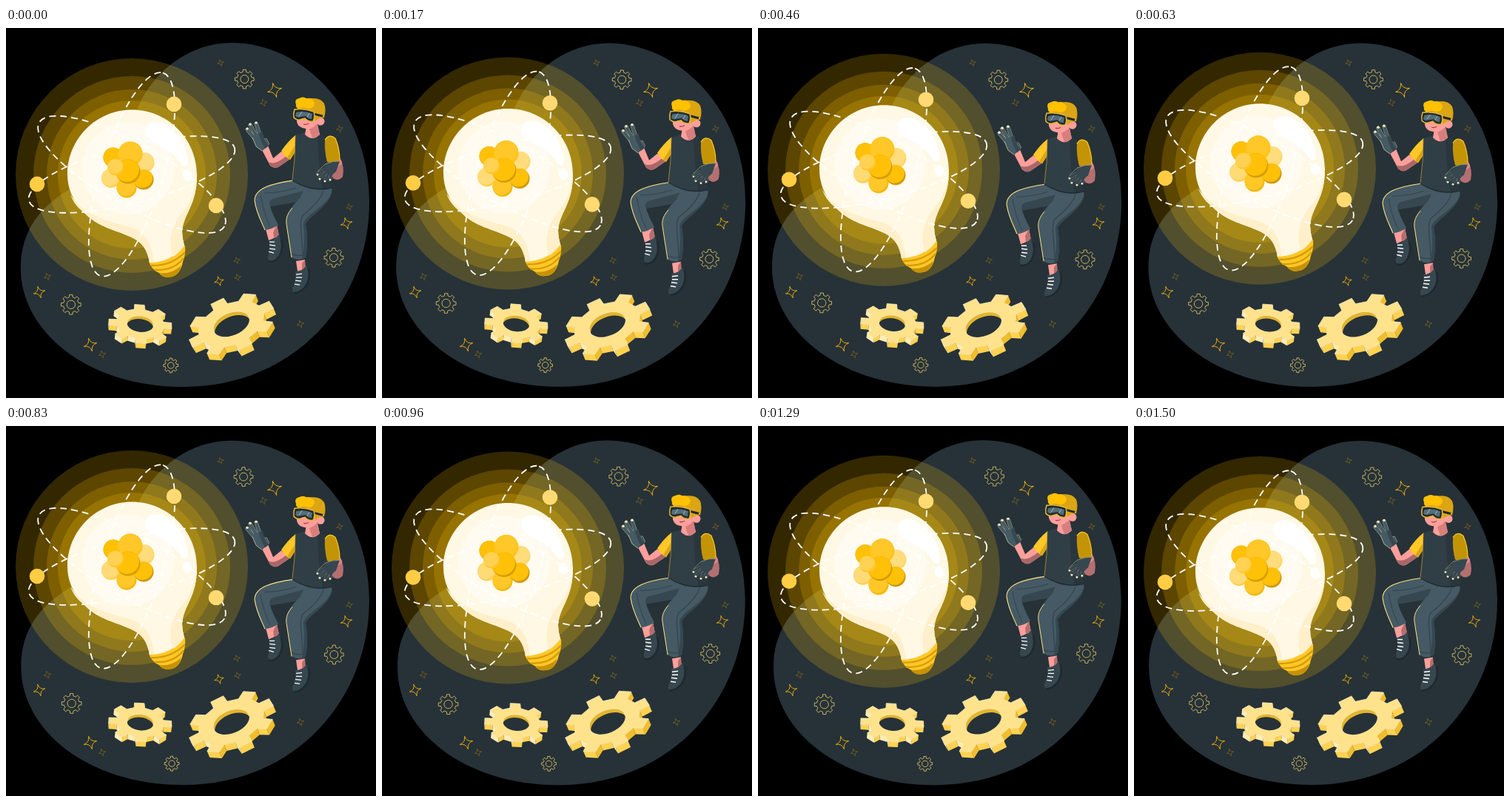
Recreate the animation shown at these times as an HTML page with a canvas. Size 500 by 500 pixels, loop 1540 ms.

```html
<!DOCTYPE html>
<html lang="en">
<head>
<meta charset="utf-8">
<style>
html, body { margin: 0; width: 100%; height: 100%; overflow: hidden; background: #000; }
canvas { display: block; width: 100vw; height: 100vh; }
</style>
</head>
<body>
<canvas id="stage" width="500" height="500"></canvas>
<script>
const ctx = document.getElementById('stage').getContext('2d');
const LOOP = 1540, TAU = Math.PI * 2;
const YELLOW = '#ffc727', GOLD = '#dba514', PALE = '#ffe28c', NAVY = '#263238';
const SLATE = '#455a64', STEEL = '#37474f', INK = '#1f2a30', SKIN = '#ff9f9b', SKIN_DARK = '#b56f70';

const wave = (t, shift) => Math.sin(TAU * (t + shift) / LOOP);

function fill(d, color) {
  ctx.fillStyle = color;
  ctx.fill(new Path2D(d));
}

function line(d, color, width = 1) {
  ctx.strokeStyle = color;
  ctx.lineWidth = width;
  ctx.stroke(new Path2D(d));
}

function oval(x, y, rx, ry, angle, color) {
  ctx.beginPath();
  ctx.ellipse(x, y, rx, ry, angle, 0, TAU);
  ctx.fillStyle = color;
  ctx.fill();
}

const disc = (x, y, r, color) => oval(x, y, r, r, 0, color);

function group(draw, dx, dy, angle = 0, cx = 0, cy = 0) {
  ctx.save();
  ctx.translate(cx + dx, cy + dy);
  ctx.rotate(angle);
  ctx.translate(-cx, -cy);
  draw();
  ctx.restore();
}

// Corner points of a cog on the unit circle, mapped by place(radius, angle).
function cogPoints(teeth, root, phase, place) {
  const points = [];
  for (let i = 0; i < teeth; i++) {
    const mid = phase + i * TAU / teeth, step = TAU / teeth;
    for (const [r, k] of [[root, -.28], [1, -.2], [1, .2], [root, .28]]) {
      points.push(place(r, mid + k * step));
    }
  }
  return points;
}

function trace(points) {
  ctx.beginPath();
  points.forEach(p => ctx.lineTo(p[0], p[1]));
  ctx.closePath();
}

function outlineCog(x, y, r) {
  ctx.strokeStyle = '#d9bd63';
  ctx.lineWidth = .9;
  trace(cogPoints(8, .77, 0, (k, a) => [x + k * r * Math.cos(a), y + k * r * Math.sin(a)]));
  ctx.stroke();
  ctx.beginPath();
  ctx.arc(x, y, r * .42, 0, TAU);
  ctx.stroke();
}

function backdrop() {
  fill('M305 20C400 20 491 110 491 235C491 370 390 485 240 485C110 485 20 410 20 325C20 275 45 240 95 213C165 175 165 130 183 97C205 55 250 20 305 20Z', NAVY);
  outlineCog(322, 69, 13);
  outlineCog(88, 374, 13.5);
  outlineCog(443, 310, 13);
  outlineCog(223, 456, 10);
}

function sparkle(x, y, r) {
  const big = r > 5;
  const at = (k, a) => [x + k * Math.cos(a - .27), y + k * Math.sin(a - .27)];
  ctx.beginPath();
  ctx.moveTo(...at(r, 0));
  for (let i = 1; i <= 4; i++) {
    ctx.quadraticCurveTo(...at(r * .12, (i - .5) * TAU / 4), ...at(r, i * TAU / 4));
  }
  ctx.strokeStyle = big ? '#e5a70c' : '#806419';
  ctx.lineWidth = big ? 1 : .8;
  ctx.stroke();
}

const SPARKLES = [
  [363, 84, 10], [348, 101, 5], [290, 47, 4.5], [451, 136, 4.5], [464, 242, 4.5],
  [460, 264, 8], [312, 314, 4.5], [288, 342, 6.5], [313, 337, 4.5], [398, 400, 5],
  [45, 357, 8], [56, 336, 5], [114, 428, 9], [130, 441, 5]
];

function solidCog({ x, y, rx, ry, tilt, phase, depth, hole }) {
  const c = Math.cos(tilt), s = Math.sin(tilt);
  const ex = -s * depth, ey = c * depth;
  const place = (k, a) => {
    const u = k * rx * Math.cos(a), v = k * ry * Math.sin(a);
    return [x + u * c - v * s, y + u * s + v * c];
  };
  const face = cogPoints(8, .76, phase, place);
  const sides = face.map((p, i) => [p, face[(i + 1) % face.length]])
    .filter(([p, q]) => (q[1] - p[1]) * ex > (q[0] - p[0]) * ey)
    .sort((m, n) => m[0][1] + m[1][1] - n[0][1] - n[1][1]);
  for (const [p, q] of sides) {
    const facing = Math.atan2(q[1] - p[1], p[0] - q[0]);
    trace([p, q, [q[0] + ex, q[1] + ey], [p[0] + ex, p[1] + ey]]);
    ctx.fillStyle = facing < -.2 ? '#ffecb3' : facing > .6 ? '#f0bd2c' : '#ffd252';
    ctx.fill();
  }
  trace(face);
  ctx.fillStyle = PALE;
  ctx.fill();
  ctx.strokeStyle = '#ffeebb';
  ctx.lineWidth = .8;
  ctx.stroke();
  ctx.save();
  ctx.beginPath();
  ctx.ellipse(x, y, rx * hole, ry * hole, tilt, 0, TAU);
  ctx.fillStyle = '#e2b530';
  ctx.fill();
  ctx.stroke();
  ctx.clip();
  oval(x + ex * .6, y + ey * .6, rx * hole, ry * hole, tilt, NAVY);
  ctx.restore();
}

function cogs() {
  solidCog({ x: 181.5, y: 400, rx: 43, ry: 26, tilt: .12, phase: -.1, depth: 7, hole: .42 });
  solidCog({ x: 304.5, y: 400, rx: 61, ry: 36.5, tilt: -.39, phase: -.1, depth: 9, hole: .42 });
}

function orbit(angle, minor) {
  ctx.beginPath();
  ctx.ellipse(170, 198, 143.5, minor, angle, 0, TAU);
  ctx.stroke();
}

function ball(x, y, r, color, shade) {
  disc(x, y, r, shade);
  ctx.save();
  ctx.beginPath();
  ctx.arc(x, y, r, 0, TAU);
  ctx.clip();
  disc(x - 1.5, y - 2.5, r, color);
  ctx.restore();
}

function bulb() {
  for (const r of [157, 133, 115, 100]) disc(170, 198, r, 'rgba(255,193,0,.2)');

  fill('M193 316L242 294Q243 307 239 316Q236 332 225 336Q212 339 207 331Q197 327 193 316Z', YELLOW);
  line('M196 321Q223 322 242 303M200 327Q226 329 240 311', '#d39c05', 2.2);
  fill('M207 331Q224 333 237 321Q234 334 225 336Q212 339 207 331Z', '#c79205');

  fill('M170 110.5C219 110.5 258 150 258 199C258 240 240 250 238 275Q238 284 241 294Q223 317 194 317C191 300 185 291 172 284C150 273 125 270 106 250C90 234 83 216 83 198C83 150 122 110.5 170 110.5Z', '#fff8e4');
  fill('M258 199C258 240 240 250 238 275Q238 284 241 294Q234 304 226 309C218 290 224 267 237 251C249 237 256 221 258 199Z', '#fff0cb');
  fill('M87 225C91 236 97 243 106 250C125 270 150 273 172 284C185 291 191 300 194 317L200 316C197 292 189 277 171 270C140 261 106 255 87 225Z', '#fff0cb');
  disc(165, 190, 62, '#fffbf0');
  fill('M190 133Q196 124 212 129Q240 143 246 178Q247 190 238 186Q226 166 200 155Q184 146 190 133Z', '#fff');
  oval(245, 199, 6, 8, -.2, '#fff');

  ctx.strokeStyle = '#fff';
  ctx.lineWidth = 1.8;
  ctx.setLineDash([9, 6]);
  orbit(-.25, 39);
  orbit(.51, 42);
  orbit(-1.273, 42);
  ctx.setLineDash([]);
  disc(227, 103, 10.3, '#ffda72');
  disc(42, 211, 10.3, '#ffcd43');
  disc(284, 240, 10.3, '#ffda72');

  ball(145, 175, 13.5, '#ffc008', '#e5a900');
  ball(187, 182, 13.5, '#ffdc7c', '#ffd766');
  ball(142, 203, 13, '#ffdb77', '#ffd04e');
  ball(163, 216, 13.5, YELLOW, '#f4b80d');
  ball(186, 205, 13.5, '#ffc008', '#cf9804');
  ball(168, 170, 16.5, YELLOW, '#ffc21a');
  ball(165, 194, 16.5, '#ffc008', '#d69d00');
  ball(148, 188, 11, '#ffd253', '#ffc72e');
}

function shoe(outline, laces, sole) {
  fill(outline, STEEL);
  line(sole, INK, 2.5);
  line(laces, '#fff', 1.4);
}

function legs() {
  fill('M351 272L366 266L369 281L355 287Z', SKIN);
  fill('M361 276L366 266L369 281L362 284Z', SKIN_DARK);
  shoe('M355 287Q363 287 369 279Q374 293 370 307Q362 317 355 314Q352 309 357 301Z',
    'M356 289L363 289M356 293L364 294M356 298L364 299M355 302L362 304',
    'M372 285Q376 298 369 309Q362 318 355 315');
  fill('M388 206C360 210 336 216 336 233C338 249 345 261 350 273Q360 272 368 266C361 253 358 245 357 241L396 234L412 215Z', SLATE);
  fill('M357 241Q354 234 360 231L402 220L395 235Z', STEEL);
  line('M388 206C360 210 336 216 336 233C338 249 345 261 350 273', '#ffe083', 1.1);
  line('M344 226Q348 250 357 268M349 223Q370 223 392 216', '#33444d', 1);

  fill('M392 315L404 313L404 326L394 329Z', SKIN);
  fill('M400 318L404 313L405 324L400 326Z', SKIN_DARK);
  shoe('M391 329Q400 329 406 321Q411 333 406 345Q400 355 391 358Q386 358 387 351Q392 342 391 329Z',
    'M392 333L400 332M392 337L400 337M391 341L399 342M390 346L397 347',
    'M409 325Q412 339 405 349Q398 358 389 358');
  fill('M438 213Q443 218 438 228C430 242 408 253 405 265Q409 288 405 310Q396 316 386 310L379 265C378 247 392 234 412 216Z', SLATE);
  fill('M441 219C435 242 405 250 402 265Q405 288 400 312L405 310Q409 288 405 265C412 252 439 240 441 219Z', STEEL);
  line('M387 243C381 250 378 256 379 265L386 310', '#ffe083', 1);
  line('M429 220Q424 235 401 253Q397 260 399 276L401 305M386 305Q396 310 406 305', '#33444d', 1.2);
}

function farHand() {
  fill('M372 167L361 176L354 159L346 165L357 186Q364 192 371 186L384 177Z', SKIN);
  fill('M384 177L371 186Q364 192 357 186L355 181Q364 186 380 172Z', '#a96768');
  fill('M391 145Q381 153 372 166Q376 174 384 178L391 167Z', YELLOW);
  fill('M391 158L380 175L384 178L391 167Z', GOLD);

  ctx.lineCap = 'round';
  const fingers = 'M335 148L326 137M338 145L330 131M343 144L338 129M345 152L351 152L353 156';
  line(fingers, '#b8b48c', 5);
  line(fingers, SLATE, 4.2);
  ctx.lineCap = 'butt';
  fill('M332 146L346 140L350 153L355 159L346 166L338 160Z', SLATE);
  fill('M346 140L350 153L355 159L350 163Q344 153 342 143Z', STEEL);
  line('M346 166L338 160L333 148', '#cfc69a', .8);
  for (const [x, y] of [[326, 136], [330, 130], [338, 128]]) disc(x, y, 1.7, '#fff1c4');
}

function nearArm() {
  fill('M440 178L451 176Q458 187 455 201Q449 208 442 203L438 194Z', SKIN_DARK);
  fill('M440 178L451 176Q455 181 454 184L441 193Z', '#dd8787');
  fill('M431 151Q437 142 445 149Q451 163 451 178Q443 185 434 181Q430 166 431 151Z', '#c49407');
  line('M431 151Q437 142 445 149Q451 163 451 178', YELLOW, 1.2);
  ctx.lineCap = 'round';
  const fingers = 'M432 190L421 197M435 193L424 203M437 195L431 206M440 194L438 205';
  line(fingers, '#7f8678', 4.3);
  line(fingers, STEEL, 3.7);
  ctx.lineCap = 'butt';
  fill('M451 180Q442 179 431 184L429 192L439 200L446 194Z', STEEL);
  line('M451 180Q442 179 431 184L421 194', '#9c9c85', .8);
  for (const [x, y] of [[421, 198], [424, 204], [431, 207], [438, 205]]) disc(x, y, 1.3, '#fff1c4');
}

function head() {
  fill('M406 132L420 128L424 144Q414 154 404 144Z', SKIN);
  fill('M410 137L421 129L424 144Q417 149 414 149Z', '#d77f7f');
  fill('M393 110L424 108L423 126Q415 138 405 136Q395 135 393 127Z', SKIN);
  disc(425, 126, 5.5, SKIN);
  fill('M394 101Q403 93 413 95Q425 94 430 102Q433 110 430 121Q423 121 418 126L415 112Q402 107 394 111Z', GOLD);
  fill('M392 104Q389 96 396 95Q401 92 406 95Q415 95 417 101Q417 108 409 109Q401 106 395 109Q391 107 392 104Z', '#ffc100');
  line('M416 116L428 119', INK, 3);
  const goggles = 'M390 110Q403 108 416 113Q418 120 415 126Q408 127 404 122L400 123Q394 126 389 121Q388 115 390 110Z';
  fill(goggles, INK);
  line(goggles, '#e5b630', 1.6);
  fill('M392 114Q403 111 414 116L413 123Q408 123 405 119L398 120Q394 122 391 119Z', '#546e7a');
  line('M396 119L400 113M407 120L410 115', '#a5b8c0', 1);
  line('M402 130Q406 131 409 129', '#a63d44', 1.2);
}

function person() {
  legs();
  farHand();
  fill('M391 145L404 141Q412 152 424 141L431 149Q434 180 440 216Q413 225 387 205Q391 177 391 145Z', '#303e46');
  fill('M424 141L431 149Q434 180 440 216L428 219Q422 185 421 145Z', '#29363d');
  line('M391 145Q391 177 387 205', '#b99636', .8);
  line('M387 206Q412 222 440 216', INK, 1.2);
  nearArm();
  head();
}

function frame(now) {
  const t = now % LOOP;
  const sway = .0166 * wave(t, 20);
  const floatBulb = 4.2 * Math.cos(TAU * (t + 50) / LOOP) - 4.2;
  const floatBody = 4 * wave(t, -70) + 1.2;

  ctx.fillStyle = '#000';
  ctx.fillRect(0, 0, 500, 500);
  group(backdrop, 0, 0, sway, 256, 253);
  SPARKLES.forEach(s => sparkle(...s));
  group(bulb, 0, floatBulb);
  group(cogs, 0, 0, sway, 251, 404);
  group(person, 0, floatBody);
  requestAnimationFrame(frame);
}
requestAnimationFrame(frame);
</script>
</body>
</html>
```
